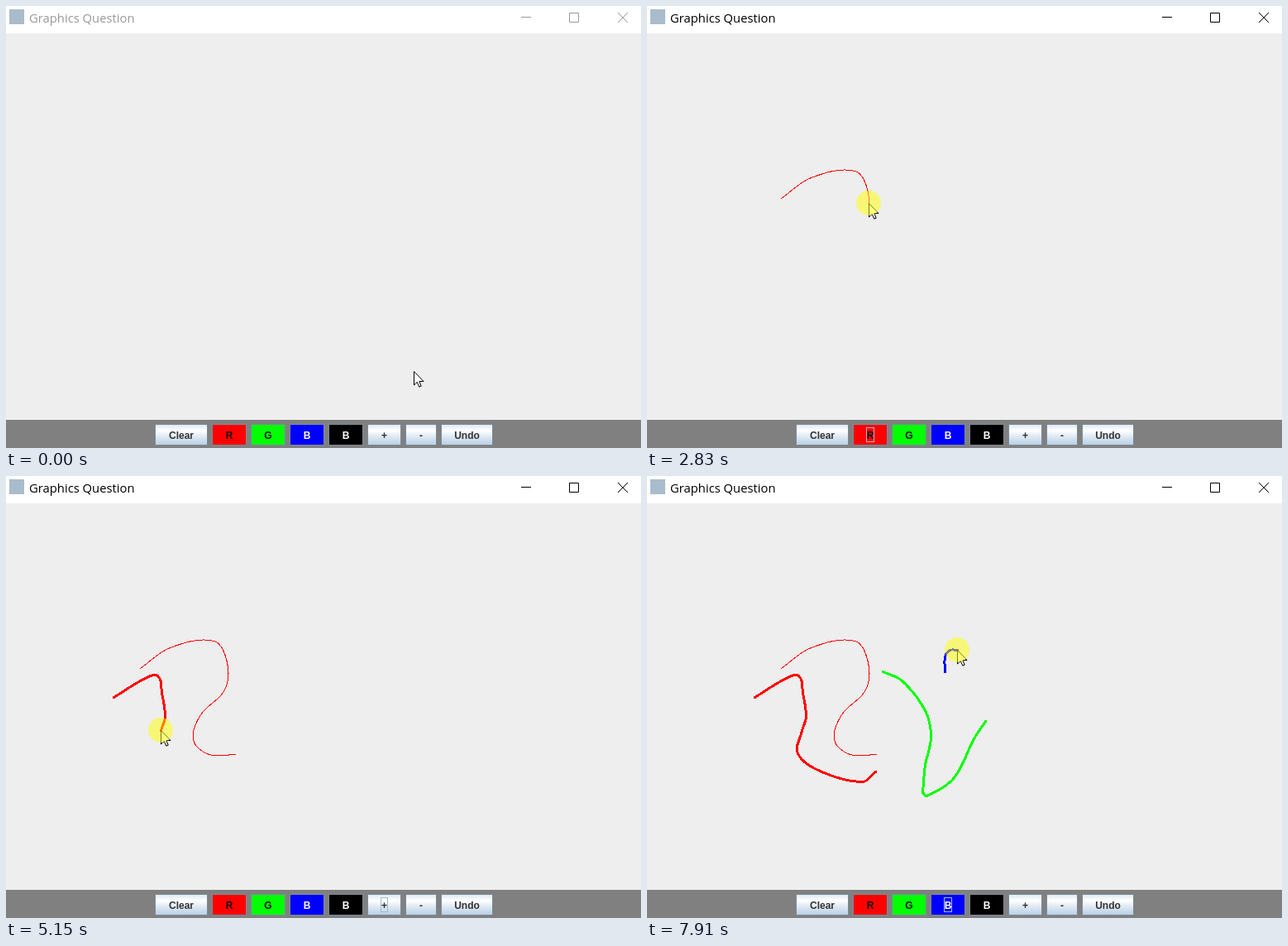
Recreate the animation shown at these times as an HTML page. Size 768 by 534 pixels, loop 8 s.

```html
<!DOCTYPE html>
<html lang="en">
<head>
<meta charset="utf-8">
<title>Graphics Question</title>
<style>
  html, body { margin: 0; width: 100%; height: 100%; overflow: hidden; background: #eee; }
  svg { display: block; width: 768px; height: 534px; }
  .title { font: 14.8px "Open Sans", "Noto Sans", sans-serif; }
  .button text { font: bold 12px "Liberation Sans", Arial, sans-serif; text-anchor: middle; }
  .focus, .rollover { fill: none; visibility: hidden; }
  .focus { stroke: #a3b8cc; }
  .rollover { stroke: #8fa3b8; stroke-width: 2; }
  .on { visibility: visible; }
  #ink path { fill: none; stroke-linecap: square; stroke-linejoin: round; }
  #chrome { color: #999; }
  #chrome.active { color: #000; }
</style>
</head>
<body>
<svg viewBox="0 0 768 534">
  <defs>
    <linearGradient id="metal" x2="0" y2="1">
      <stop offset="0" stop-color="#dde8f3"/>
      <stop offset=".3" stop-color="#fff"/>
      <stop offset=".6" stop-color="#dde8f3"/>
      <stop offset="1" stop-color="#b8cfe5"/>
    </linearGradient>
  </defs>
  <rect width="768" height="534" fill="#eee"/>
  <rect width="768" height="33" fill="#fff"/>
  <rect x="4" y="4" width="18" height="18" fill="#a9bccb"/>
  <g id="chrome">
    <text class="title" x="28" y="20" fill="currentColor">Graphics Question</text>
    <path d="M623 13.5H635M681.5 8.5H692.5V19.5H681.5ZM740 8L752 20M752 8L740 20"
          fill="none" stroke="currentColor"/>
  </g>
  <g id="ink" transform="translate(.5 .5)" shape-rendering="crispEdges"></g>
  <rect y="500" width="768" height="34" fill="#808080"/>
  <g id="buttons"></g>
  <path id="cursor" d="M.5 .5V17L4.3 13.4L6.8 19.2L9.2 18.2L6.8 12.5H12Z" fill="#fff" stroke="#000"/>
  <circle id="glow" r="15" fill="#ff0" fill-opacity=".5"/>
</svg>
<script>
const LOOP = 8000;
const $ = id => document.getElementById(id);

function make(parent, tag, attrs) {
  const el = document.createElementNS('http://www.w3.org/2000/svg', tag);
  for (const key in attrs) el.setAttribute(key, attrs[key]);
  return parent.appendChild(el);
}

// Toolbar: buttons flow from left to right with equal gaps and padding
let edge = 180;
function addButton(label, width, fill = 'url(#metal)', ink = '#333') {
  const x = edge;
  edge += width + 5;
  const group = make($('buttons'), 'g', { class: 'button' });
  const face = make(group, 'rect', { x: x + .5, y: 505.5, width: width - 1, height: 25, fill, stroke: '#7a8a99' });
  const rollover = make(group, 'rect', { class: 'rollover', x: x + 2, y: 507, width: width - 4, height: 22 });
  make(group, 'text', { x: x + width / 2, y: 523, fill: ink }).textContent = label;
  const focus = make(group, 'rect', { class: 'focus', x: x + 16.5, y: 509.5, width: width - 33, height: 17 });
  return { x, width, fill, face, rollover, focus };
}
const clear = addButton('Clear', 64);
const red = addButton('R', 42, '#f00', '#111');
const green = addButton('G', 42, '#0f0', '#111');
const blue = addButton('B', 42, '#00f', '#fff');
const black = addButton('B', 42, '#000', '#fff');
const plus = addButton('+', 41);
const minus = addButton('-', 38);
const undo = addButton('Undo', 63);
const buttons = [clear, red, green, blue, black, plus, minus, undo];

// Smooth curve through points, with handles a third of each span
function curve(points) {
  const handle = (i, span) => {
    const [a, b] = [points[Math.max(0, i - 1)], points[Math.min(points.length - 1, i + 1)]];
    const k = span / 3 / Math.hypot(b[0] - a[0], b[1] - a[1]);
    return [(b[0] - a[0]) * k, (b[1] - a[1]) * k];
  };
  return points.slice(1).reduce((d, [x, y], i) => {
    const [px, py] = points[i];
    const span = Math.hypot(x - px, y - py);
    const [h, g] = [handle(i, span), handle(i + 1, span)];
    return `${d}C${px + h[0]} ${py + h[1]} ${x - g[0]} ${y - g[1]} ${x} ${y}`;
  }, `M${points[0]}`);
}

// The session: each step runs from the current clock to the given time
let clock = 0, at = [493, 441], colour = black.fill, width = 1;
const legs = [], presses = [];

const wait = until => { clock = until; };

function travel(until, points, inked) {
  const path = make($('ink'), 'path', {
    d: curve([at, ...points]), stroke: inked ? colour : 'none', 'stroke-width': width });
  legs.push({ start: clock, end: until, erased: Infinity, path, length: path.getTotalLength() });
  if (inked) presses.push({ start: clock, end: until });
  at = points[points.length - 1];
  wait(until);
}
const move = (until, x, y) => travel(until, [[x, y]], false);
const draw = (until, ...points) => travel(until, points, true);

function click(button, until) {
  presses.push({ start: clock, end: until, button });
  wait(until);
  if (button === clear) legs.forEach(leg => { leg.erased = until; });
  else if (button === plus) width++;
  else colour = button.fill;
}

wait(70);
move(290, 118, 186);
const activated = clock;
draw(890, [131, 186], [163, 168], [208, 151], [250, 148], [278, 164], [287, 200], [279, 237],
  [245, 252], [205, 254], [185, 277], [177, 318], [188, 335], [218, 335]);
draw(1200, [280, 325], [319, 302]);
wait(1290);
move(1640, 208, 512);
click(clear, 1815);
move(2090, 267, 513);
click(red, 2210);
move(2560, 162, 232);
wait(2600);
draw(3080, [198, 207], [251, 199], [267, 225], [264, 258], [235, 288], [226, 318], [245, 336], [277, 336]);
move(3370, 486, 487);
move(3620, 462, 518);
wait(3790);
click(plus, 3865);
wait(3945);
click(plus, 4020);
move(4560, 151, 250);
move(4660, 130, 267);
draw(5150, [166, 245], [183, 241], [188, 262], [192, 290], [187, 307]);
draw(5480, [182, 335], [211, 357], [260, 369], [276, 357]);
move(5790, 317, 513);
click(green, 5930);
move(6320, 285, 236);
draw(6720, [308, 247], [336, 283], [343, 315], [336, 349], [333, 382]);
draw(7000, [338, 386], [371, 364], [395, 317], [409, 296]);
move(7230, 364, 513);
wait(7290);
click(blue, 7420);
move(7720, 360, 236);
draw(7910, [360, 218], [366, 210], [375, 210]);
presses.push({ start: clock, end: LOOP });

function pointerAt(t) {
  const leg = legs.filter(l => l.start <= t).pop() || legs[0];
  const part = Math.min(1, Math.max(0, (t - leg.start) / (leg.end - leg.start)));
  return leg.path.getPointAtLength(leg.length * part);
}

function focusAt(t) {
  const clicked = presses.filter(p => p.button && p.start <= t).pop();
  return clicked ? clicked.button : t >= activated && clear;
}

function render(t) {
  for (const { start, end, erased, path, length } of legs) {
    const part = Math.min(1, (t - start) / (end - start));
    path.style.display = part > 0 && t < erased ? '' : 'none';
    path.style.strokeDasharray = part < 1 ? `${length * Math.max(0, part)} ${length + 9}` : 'none';
  }

  const { x, y } = pointerAt(t);
  const down = presses.some(p => t >= p.start && t < p.end);
  const place = `translate(${Math.round(x)} ${Math.round(y)})`;
  $('cursor').setAttribute('transform', place);
  $('glow').setAttribute('transform', place);
  $('glow').style.display = down ? '' : 'none';
  $('chrome').classList.toggle('active', t >= activated);

  const focused = focusAt(t);
  for (const b of buttons) {
    const over = y >= 505 && y < 531 && x >= b.x && x < b.x + b.width;
    b.face.setAttribute('fill', over && down ? '#b8cfe5' : b.fill);
    b.rollover.classList.toggle('on', over && !down);
    b.focus.classList.toggle('on', b === focused);
  }
}

const began = performance.now();
function tick() {
  render((performance.now() - began) % LOOP);
  requestAnimationFrame(tick);
}
tick();
</script>
</body>
</html>
```
